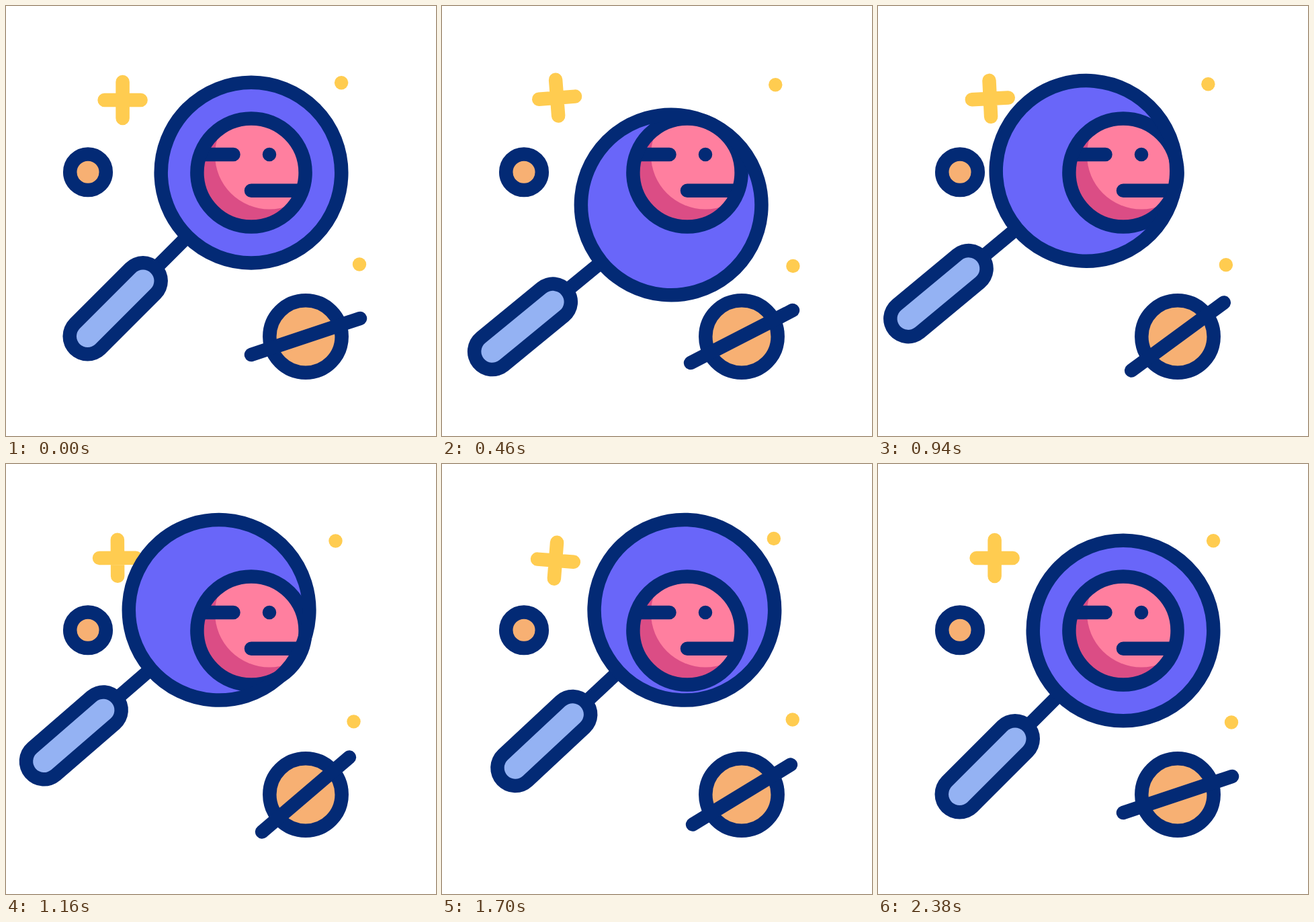
Recreate the animation shown at these times as an HTML page. Size 640 by 640 pixels, loop 2.4 s.

```html
<!DOCTYPE html>
<html lang="en">
<head>
<meta charset="utf-8">
<title>Space search</title>
<style>
  html, body { margin: 0; width: 100%; height: 100%; overflow: hidden; background: #fff; }
  svg { display: block; width: 100%; height: 100%; }
  path, .rim { fill: none; stroke: #032a75; stroke-width: 20.5; stroke-linecap: round; }
  .planet { fill: #f7b073; }
  .grip { stroke-width: 74; }
  .grip.inner { stroke: #94b2f3; stroke-width: 33; }
  #plus { stroke: #ffcc50; }
  .dot { fill: #ffcc50; }
</style>
</head>
<body>
<svg viewBox="0 0 640 640">
  <clipPath id="disc"><circle cx="365" cy="248" r="80"/></clipPath>

  <path id="plus" d="M-27 0H27M0-27V27"/>
  <circle id="dotTop" class="dot" r="10.2"/>
  <circle id="dotLow" class="dot" r="10.2"/>

  <circle class="rim planet" cx="122" cy="247.3" r="26.8"/>
  <circle class="rim planet" cx="446" cy="492" r="53.7"/>
  <path id="belt" d="M-81 27L81-27"/>

  <g id="glass">
    <path d="M-95 95L-145 145"/>
    <path class="grip" d="M-161 161L-243.5 243.5"/>
    <path class="grip inner" d="M-161 161L-243.5 243.5"/>
    <circle r="134.3" fill="#6966f9"/>
  </g>

  <g clip-path="url(#disc)">
    <circle cx="365" cy="248" r="80" fill="#db4d85"/>
    <circle cx="392" cy="221.5" r="81" fill="#ff7f9f"/>
    <path d="M290 221H338.5M392 221h.01M365 274.8H440"/>
  </g>
  <circle class="rim" cx="365" cy="248" r="80.6"/>
  <circle id="frame" class="rim" r="134.3"/>
</svg>
<script>
const LOOP = 2400, MOVE = 2380; // the closing pose is held briefly
const TAU = 2 * Math.PI;

// Evenly timed stops of the magnifier: x, y, tilt in degrees
const stops = [
  [365, 248, 0], [352, 289, 4.3], [331.5, 292.5, 6.2], [310.5, 252, 5.5],
  [318.6, 215, 4], [341.5, 210.5, 2.9], [366.5, 221.5, 1.6], [371, 241.5, .4]
];

// Closed Catmull-Rom curve through the stops
function along(points, u) {
  const n = points.length, i = Math.floor(u * n), s = u * n - i;
  const [a, b, c, d] = [-1, 0, 1, 2].map(k => points[(i + k + n) % n]);
  return b.map((p, k) => p + s / 2 * (c[k] - a[k] +
    s * (2 * a[k] - 5 * p + 4 * c[k] - d[k] + s * (3 * (p - c[k]) + d[k] - a[k]))));
}

function orbit(u, x, y, rx, ry, phase = 0) {
  const angle = TAU * u + phase;
  return [x + rx * Math.cos(angle), y + ry * Math.sin(angle)];
}

function place(id, x, y, angle = 0) {
  document.getElementById(id).setAttribute("transform", `translate(${x} ${y}) rotate(${angle})`);
}

function draw(now) {
  const u = Math.min(now % LOOP / MOVE, 1);
  const glass = along(stops, u);
  place("glass", ...glass);
  place("frame", ...glass);
  place("plus", ...orbit(u, 169.8, 140.1, 3.8, -3.7), -4.6 * Math.sin(TAU * u));
  place("dotTop", ...orbit(u, 494.8, 114.2, 4.3, 3.3));
  place("dotLow", ...orbit(u, 521.8, 383.8, 4.3, 3.3, .21));
  place("belt", 446, 492, -22.6 * (1 - Math.abs(2 * u - 1)));
  requestAnimationFrame(draw);
}
draw(0);
</script>
</body>
</html>
```
